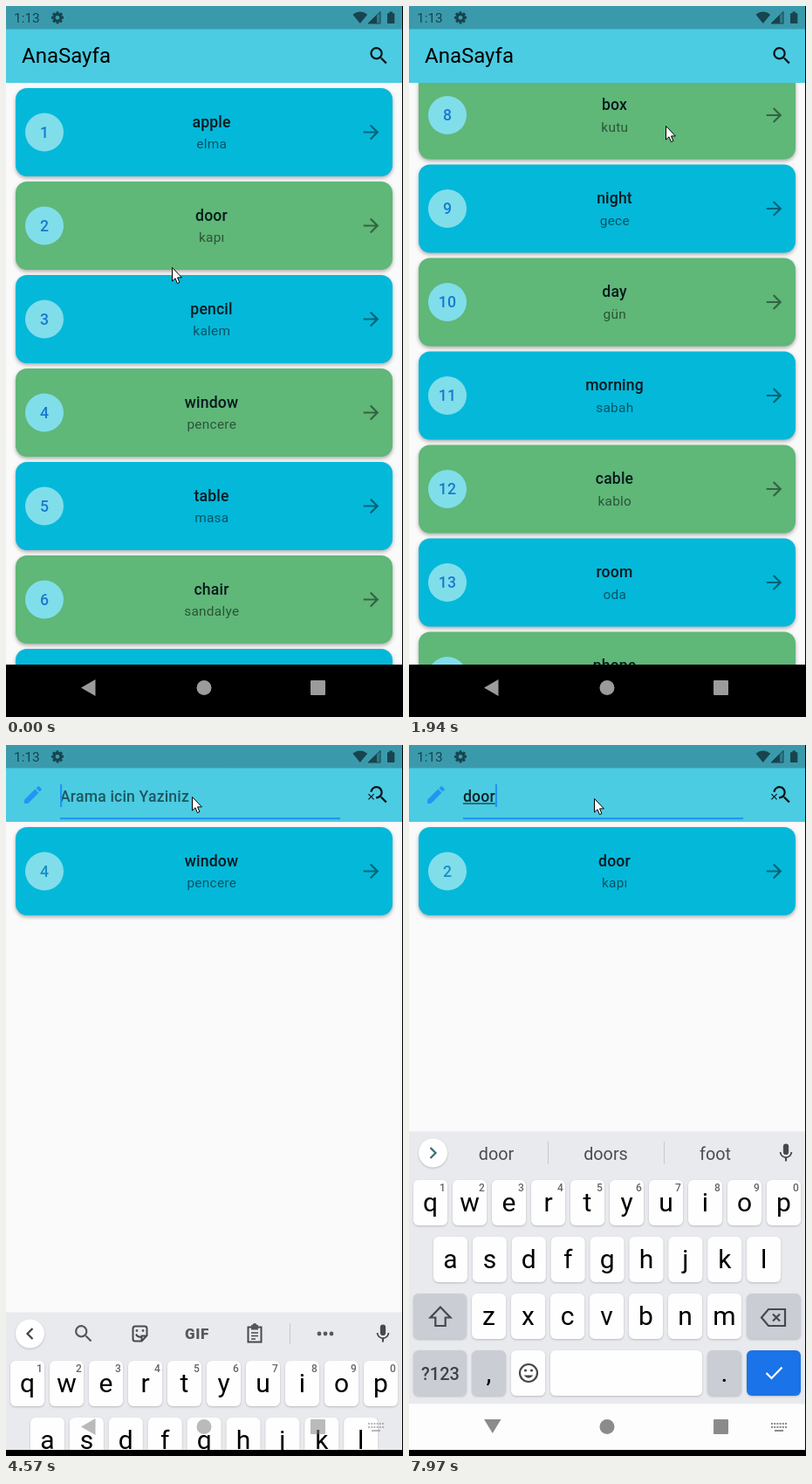
These frames come from a looping animation (455 by 814 pixels, 8 s). An HTML page:

```html
<!DOCTYPE html>
<html lang="tr">
<head>
<meta charset="utf-8">
<title>AnaSayfa</title>
<style>
html, body { margin: 0; width: 100%; height: 100%; overflow: hidden; background: #000; }
svg { display: block; width: 100%; height: 100%; font-family: Roboto, sans-serif; }
.mid { text-anchor: middle; }
.title { font-size: 17.6px; font-weight: 500; letter-spacing: .165px; }
.sub { font-size: 15.4px; letter-spacing: .28px; fill: #000; fill-opacity: .54; }
.key { font-size: 30px; }
.hint { font-size: 12px; font-weight: 500; fill: #666; }
.word { font-size: 19.8px; fill: #4a4e54; }
.line { fill: none; stroke: #45484d; stroke-width: 2.2; }
.card { filter: drop-shadow(0 2px 2px rgba(0, 0, 0, .32)); }
.lift { filter: drop-shadow(0 1px 1px rgba(0, 0, 0, .2)); }
</style>
</head>
<body>
<svg viewBox="0 0 455 814" xmlns="http://www.w3.org/2000/svg">
  <defs>
    <clipPath id="list"><rect y="88" width="454" height="666"/></clipPath>
    <clipPath id="screen"><rect width="454" height="807"/></clipPath>
    <clipPath id="bar"><rect width="454" height="88"/></clipPath>
  </defs>
  <rect width="454" height="754" fill="#fafafa"/>
  <g id="cards" clip-path="url(#list)"></g>
  <g id="appBar" clip-path="url(#bar)"></g>
  <g id="status"></g>
  <g id="keyboard" clip-path="url(#screen)"></g>
  <g id="nav"></g>
  <path id="pointer" d="M.5.5V16L4 12.8 6.4 18.6 8.9 17.5 6.5 11.9H11.4Z" fill="#fff" stroke="#000"/>
</svg>
<script>
const LOOP = 8000;
const WORDS = [
  'apple elma', 'door kapı', 'pencil kalem', 'window pencere', 'table masa', 'chair sandalye', 'lock kilit',
  'box kutu', 'night gece', 'day gün', 'morning sabah', 'cable kablo', 'room oda', 'phone telefon'
].map((pair, i) => [i + 1, ...pair.split(' ')]);

// Each step changes only the listed values.
const STEPS = [
  [0, { scroll: 0, at: [190, 299], ripple: 0, search: false, focus: false, caret: false, typed: '', kb: null }],
  [340, { scroll: 28, at: [196, 272] }],
  [540, { scroll: 185, at: [228, 112] }],
  [740, { scroll: 310, at: [246, 6] }],
  [940, { scroll: 368, at: [248, 150] }],
  [1140, { scroll: 391, at: [236, 390] }],
  [1340, { scroll: 395, at: [229, 485] }],
  [1540, { scroll: 480, at: [250, 402] }],
  [1740, { scroll: 652, at: [280, 235] }],
  [1940, { scroll: 768.5, at: [294, 137] }],
  [2140, { scroll: 790, at: [335, 112] }],
  [2340, { scroll: 796, at: [395, 80] }],
  [2540, { at: [425, 60] }],
  [2740, { ripple: 22 }],
  [2960, { ripple: 38 }],
  [3160, { ripple: 0, search: true, at: [405, 64] }],
  [3360, { at: [290, 62] }],
  [3560, { at: [213, 59] }],
  [4370, { focus: true, caret: true }],
  [4570, { kb: 207 }],
  [4770, { kb: 40 }],
  [4970, { kb: 4, caret: false }],
  [5170, { kb: 0 }],
  [5570, { caret: true, at: [212, 61] }],
  [5970, { caret: false }],
  [6170, { caret: true, typed: 'd' }],
  [6370, { typed: 'do' }],
  [6970, { caret: false }],
  [7370, { caret: true, typed: 'doo' }],
  [7970, { typed: 'door' }]
];
const SUGGEST = {
  d: ['d', 'do', 'did'], do: ['do', "don't", 'does'], doo: ['doo', 'door', 'food'], door: ['door', 'doors', 'foot']
};
const ICONS = {
  search: 'M15.5 14h-.79l-.28-.27A6.5 6.5 0 1 0 13.73 14.43l.27.28v.79l5 4.99L20.49 19zM9.5 14a4.5 4.5 0 1 1 0-9 4.5 4.5 0 0 1 0 9z',
  searchOff: 'M15.5 14h-.79l-.28-.27A6.5 6.5 0 1 0 3.03 9H5.05A4.5 4.5 0 1 1 9 13.95V15.97A6.5 6.5 0 0 0 13.73 14.43l.27.28v.79l5 4.99L20.49 19zM6.47 10.82L4 13.29 1.53 10.82.82 11.53 3.29 14 .82 16.47 1.53 17.18 4 14.71 6.47 17.18 7.18 16.47 4.71 14 7.18 11.53z',
  edit: 'M3 17.25V21h3.75L17.81 9.94 14.06 6.19zM20.71 7.04a1 1 0 0 0 0-1.41l-2.34-2.34a1 1 0 0 0-1.41 0l-1.83 1.83 3.75 3.75z',
  arrow: 'M12 4L10.59 5.41 16.17 11H4v2h12.17l-5.58 5.59L12 20l8-8z',
  mic: 'M12 14a3 3 0 0 0 3-3V5a3 3 0 0 0-6 0v6a3 3 0 0 0 3 3zM17.3 11a5.3 5.1 0 0 1-10.6 0H5a7 6.8 0 0 0 6 6.72V21h2v-3.28A7 6.8 0 0 0 19 11z'
};

const $ = id => document.getElementById(id);
const rect = (x, y, w, h, fill, r = 0, cls = '') =>
  `<rect x="${x}" y="${y}" width="${w}" height="${h}" rx="${r}" fill="${fill}" class="${cls}"/>`;
const circle = (x, y, r, fill, cls = '') => `<circle cx="${x}" cy="${y}" r="${r}" fill="${fill}" class="${cls}"/>`;
const path = (d, attrs) => `<path d="${d}" ${attrs}/>`;
const text = (x, y, s, cls, attrs = '') => `<text x="${x}" y="${y}" class="${cls}" ${attrs}>${s}</text>`;
const icon = (name, x, y, size, fill) => path(ICONS[name],
  `fill="${fill}" transform="translate(${x - size / 2} ${y - size / 2}) scale(${size / 24})"`);

function card([no, word, meaning], index, scroll, searching) {
  const y = 94 + index * 107 - scroll;
  if (y > 760 || y < -20) return '';
  return `<g transform="translate(0 ${y})">`
    + rect(11, 0, 432, 101, index % 2 ? '#5fb778' : '#04b8da', 13, 'card')
    + circle(44, 50.5, 22, '#80deea')
    + text(44, 56.5, no, 'title mid', `fill="${searching ? '#158fc6' : '#1879cf'}"`)
    + text(235.5, 44.5, word, 'title mid', 'fill="#08191d"')
    + text(235.8, 69, meaning, 'sub mid')
    + icon('arrow', 418.5, 50.5, 26.4, 'rgba(0,0,0,.45)') + '</g>';
}

function cards(s) {
  const query = s.typed || 'window';
  const shown = s.search ? WORDS.filter(w => w[1].includes(query)) : WORDS;
  return shown.map((w, i) => card(w, i, s.search ? 0 : s.scroll, s.search)).join('');
}

function appBar(s) {
  const bar = rect(0, 26, 454, 62, '#4bcce2');
  if (!s.search) {
    return bar + circle(427, 57, s.ripple, 'rgba(140,200,210,.36)')
      + text(18, 65.3, 'AnaSayfa', '', 'font-size="24"') + icon('search', 427.3, 57, 26.4, '#0a1416');
  }
  const accent = s.focus ? '#2196f3' : 'rgba(0,0,0,.45)';
  return bar + icon('edit', 31, 57, 26.4, accent)
    + text(62, 64.8, s.typed || 'Arama icin Yaziniz', 'title', `id="field" fill="${s.typed ? '#0c2226' : '#1f565f'}"`)
    + rect(62, 83, 321, s.focus ? 2.2 : 1.1, accent)
    + icon('searchOff', 427.3, 57, 26.4, '#0a1416');
}

function addCaret(s) {
  if (!s.search) return;
  const length = s.typed ? $('field').getComputedTextLength() : 0;
  const mark = s.typed ? rect(62, 66.5, length, 1.1, '#0c2226') : '';
  $('appBar').insertAdjacentHTML('beforeend', mark + (s.caret ? rect(62 + length, 45, 2.2, 26, '#2196f3') : ''));
}

function status() {
  const ink = '#17444e';
  const ring = (r, w, dash) => `<circle cx="59" cy="13.3" r="${r}" fill="none" stroke="${ink}" stroke-width="${w}" ${dash}/>`;
  return rect(0, 0, 454, 26.5, '#3a9aac')
    + text(9, 19, '1:13', '', `font-size="15.4" fill="${ink}"`)
    + ring(4, 3.2, '') + ring(6.1, 2, 'pathLength="16" stroke-dasharray="1.2 .8" transform="rotate(-14 59 13.3)"')
    + path('M405.8 20L397.4 9.8Q405.8 3.2 414.2 9.8Z', `fill="${ink}"`)
    + path('M429 6.5V20H415Z', `fill="${ink}" opacity=".35"`)
    + path('M425 10.5V20H415Z', `fill="${ink}"`)
    + path('M429 6.5V20H415Z', `fill="none" stroke="${ink}"`)
    + path('M437 8.2h2.5V6.5h3.5v1.7h2.3V20H437Z', `fill="${ink}"`);
}

function key(x, y, w, label = '', tone = '#fefefe') {
  return rect(x, y, w, 52, tone, 6, 'lift') + (label && text(x + w / 2, y + 35.5, label, 'key mid'));
}

function toolbar(typed) {
  const ink = '#55585d';
  const toggle = circle(27.5, 467, 16.5, '#fff', 'lift')
    + path(typed ? 'M24.5 461l6 6-6 6' : 'M30.5 461l-6 6 6 6', `class="line" style="stroke:${typed ? '#3d6b74' : '#3f4246'}"`)
    + icon('mic', 432, 467, 25, '#45484d');
  if (typed) {
    return toggle + [100, 225.5, 351].map((x, i) => text(x, 474.5, SUGGEST[typed][i], 'word mid')).join('')
      + rect(159, 454, 1, 26, '#c6c8cd') + rect(292, 454, 1, 26, '#c6c8cd');
  }
  return toggle + icon('search', 89, 467, 26.4, ink)
    + path('M148 458.5H159Q161.500 458.500 161.500 461V469L155.500 475.500H148Q145.500 475.500 145.500 473V461Q145.500 458.500 148 458.500ZM155.500 475V469.500H161M149 467.500q2 4 6 3', 'class="line" style="stroke-width:2"')
    + circle(150, 463.5, 1.4, ink) + circle(157, 463.5, 1.4, ink)
    + text(219, 473, 'GIF', 'mid', `font-size="17" font-weight="900" letter-spacing=".6" fill="${ink}"`)
    + path('M277.500 459.500H292.500V476.500H277.500Z', 'class="line" style="stroke-width:2"')
    + rect(281, 457, 8, 5.5, ink) + circle(285, 457.5, 2.5, ink)
    + path('M281 466H289M281 469.500H289M281 473H286', 'class="line" style="stroke-width:1.7"')
    + rect(325, 455, 1, 24, '#c6c8cd')
    + [359, 366, 373].map(x => circle(x, 467, 2.4, ink)).join('');
}

function keyboard(s) {
  if (s.kb === null) return '';
  const grey = '#cbcdd5';
  const row = (letters, x, y, pitch) => [...letters].map((c, i) => key(x + i * pitch, y, 39, c)).join('');
  const digits = [...'1234567890'].map((d, i) => text(38.3 + i * 45, 511, d, 'hint mid')).join('');
  return rect(0, 88 + 666, 454, 53, '#fafafa')
    + `<g transform="translate(0 ${s.kb})">`
    + rect(0, 442.5, 454, 312, '#e9eaee') + rect(0, 754.5, 454, 60, '#fdfdfd')
    + toolbar(s.typed)
    + row('qwertyuiop', 5, 498, 45) + digits
    + row('asdfghjkl', 28, 563, 44.9)
    + key(5, 628, 61, '', grey) + row('zxcvbnm', 72, 628, 45) + key(387, 628, 62, '', grey)
    + path('M36 643.500L24.500 655.500H30.300V665H41.700V655.500H47.500Z', 'class="line"')
    + path('M412 646H431V665H412L404 655.500ZM417 651.500l8 8m0-8l-8 8', 'class="line"')
    + key(5, 693, 61, '', grey) + text(36, 726.5, '?123', 'mid', 'font-size="20" font-weight="500" fill="#3f4246"')
    + key(72, 693, 39, ',', grey) + key(117, 693, 39) + key(162, 693, 174)
    + key(342, 693, 39, '.', grey) + key(387, 693, 62, '', '#1a73e8')
    + `<circle cx="137" cy="719" r="10" class="line"/>` + circle(133.5, 716, 1.6, '#45484d') + circle(140.5, 716, 1.6, '#45484d')
    + path('M131.500 721.500q5.500 6.500 11 0z', 'fill="#45484d"')
    + path('M409.500 719l6 6 12-12.500', 'class="line" style="stroke:#fff"') + '</g>';
}

function nav(s) {
  const open = s.kb !== null, rising = s.kb > 10;
  const ink = !open ? '#9b9b9b' : rising ? 'rgba(130,130,130,.55)' : '#8b8b8b';
  const back = open && !rising ? 'M86 772H105.500L95.800 788Z' : 'M86 780.500L102.500 771V790Z';
  const dots = y => path(`M415 ${y}H433`, `stroke="${ink}" stroke-width="2" stroke-dasharray="2 1.2"`);
  return rect(0, open ? 807 : 754, 454, 60, '#000')
    + path(back, `fill="${ink}"`) + circle(227, 780.5, 8.5, ink) + rect(349, 772, 17, 17, ink, 1)
    + (open ? dots(777) + dots(781) + rect(419, 784, 10, 2, ink) : '');
}

let shownStep = -1;
function draw(step) {
  const s = Object.assign({}, ...STEPS.slice(0, step + 1).map(entry => entry[1]));
  const parts = { cards, appBar, keyboard, nav };
  for (const id in parts) $(id).innerHTML = parts[id](s);
  addCaret(s);
  $('pointer').setAttribute('transform', `translate(${s.at})`);
}

function tick() {
  const time = performance.now() % LOOP;
  let step = STEPS.length - 1;
  while (STEPS[step][0] > time) step--;
  if (step !== shownStep) draw(shownStep = step);
  requestAnimationFrame(tick);
}

$('status').innerHTML = status();
tick();
</script>
</body>
</html>
```
